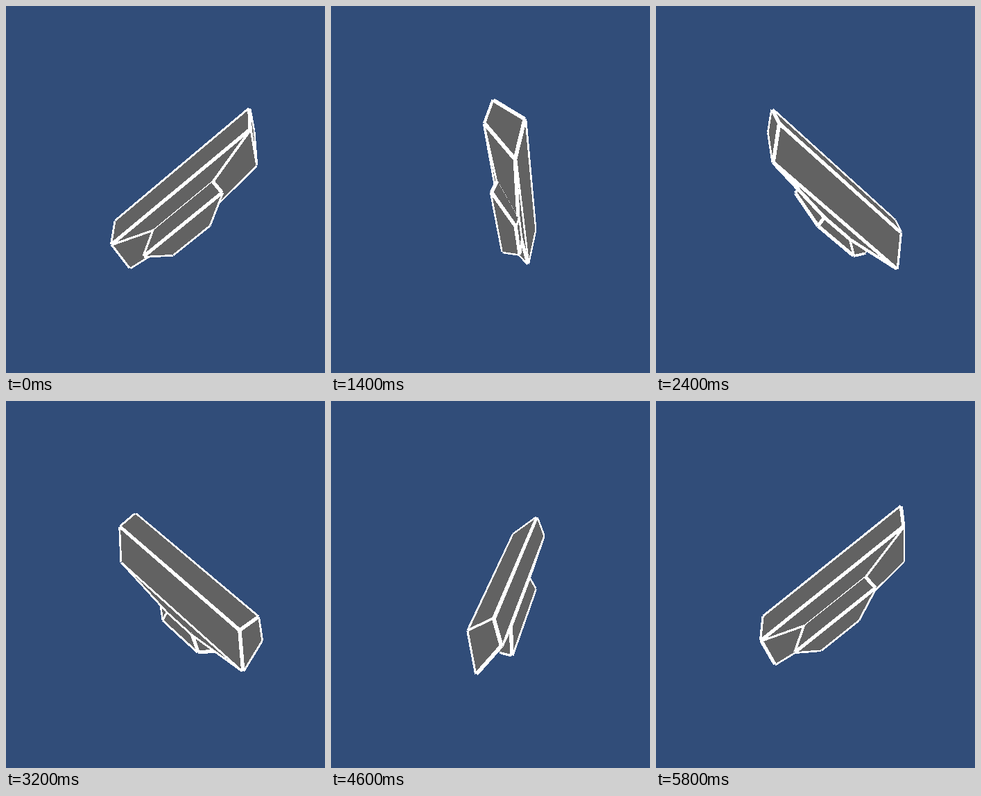
An HTML page with a canvas that plays this animation: 460 by 530 pixels, repeating every 6000 ms.

```html
<!DOCTYPE html>
<html lang="en">
<head>
<meta charset="utf-8">
<title>Rotating solid</title>
<style>
  html, body { margin: 0; width: 100%; height: 100%; overflow: hidden; background: #314d79; }
  canvas { display: block; }
</style>
</head>
<body>
<canvas id="stage" width="460" height="530"></canvas>
<script>
const W = 460, H = 530, CX = 260, CY = 288, DEPTH = 731;
const STEP_MS = 200, STEPS = 30;
const TILT = 38.7 * Math.PI / 180, PHASE = 12.7 * Math.PI / 180;
const LINE = 5, BIAS = 3e-4;
const BACK = 0xff794d31, GREY = 0xff626262, WHITE = 0xffffffff; // ABGR

const ctx = document.getElementById('stage').getContext('2d');
const image = ctx.createImageData(W, H);
const pixels = new Uint32Array(image.data.buffer);
const depths = new Float32Array(W * H);

// Edges along the long axis: cross-section place (u, v), then start and end.
// Each pair of edges makes one ring of four corners.
const bars = [
  [-12, -46.7, -95, 155], [28, -25.7, -95, 141],
  [-22.8, -22, -117, 138], [16.3, 16.8, -130, 113],
  [-14.3, -0.8, -56, 53], [12.5, 27.9, -41, 8],
  [-20.2, 20.7, -90, 54], [9.7, 42.5, -63, 7]
];
const points = bars.flatMap(([u, v, from, to], i) =>
  (i % 2 ? [to, from] : [from, to]).map(t => [t, u, v]));

const faces = [[0, 1, 2, 3], [12, 13, 14, 15]];
const edges = [];
points.forEach((_, i) => {
  const next = i - i % 4 + (i + 1) % 4;
  edges.push([i, next]);
  if (i < 12) {
    edges.push([i, i + 4]);
    faces.push([i, next, next + 4, i + 4]);
  }
});

function project([t, u, v], angle) {
  const h = t * Math.cos(TILT) + v * Math.sin(TILT);
  const y = v * Math.cos(TILT) - t * Math.sin(TILT);
  const c = Math.cos(angle), s = Math.sin(angle);
  const k = DEPTH / (DEPTH + u * c - h * s);
  return { x: CX + (h * c + u * s) * k, y: CY + y * k, k };
}

const cross = (a, b, x, y) => (b.x - a.x) * (y - a.y) - (b.y - a.y) * (x - a.x);

// Depth-tested triangle; a larger k is nearer.
function triangle(a, b, c, colour) {
  const area = cross(a, b, c.x, c.y);
  if (!area) return;
  const x0 = Math.floor(Math.min(a.x, b.x, c.x)), x1 = Math.max(a.x, b.x, c.x);
  const y0 = Math.floor(Math.min(a.y, b.y, c.y)), y1 = Math.max(a.y, b.y, c.y);
  for (let y = y0; y <= y1; y++) {
    for (let x = x0; x <= x1; x++) {
      const wa = cross(b, c, x + 0.5, y + 0.5) / area;
      const wb = cross(c, a, x + 0.5, y + 0.5) / area;
      const wc = 1 - wa - wb;
      if (wa < 0 || wb < 0 || wc < 0) continue;
      const k = wa * a.k + wb * b.k + wc * c.k, at = y * W + x;
      if (k > depths[at]) {
        depths[at] = k;
        pixels[at] = colour;
      }
    }
  }
}

function quad([a, b, c, d], colour) {
  triangle(a, b, c, colour);
  triangle(a, c, d, colour);
}

// A ribbon that faces the viewer, so nearer faces hide part of its width.
function line(a, b) {
  const size = LINE / 2 / Math.hypot(b.x - a.x, b.y - a.y);
  const nx = (a.y - b.y) * size, ny = (b.x - a.x) * size;
  const corner = (p, side) => ({
    x: p.x + nx * p.k * side, y: p.y + ny * p.k * side, k: p.k + BIAS
  });
  quad([corner(a, 1), corner(b, 1), corner(b, -1), corner(a, -1)], WHITE);
}

function draw(step) {
  const pts = points.map(p => project(p, PHASE + step / STEPS * 2 * Math.PI));
  pixels.fill(BACK);
  depths.fill(0);
  faces.forEach(face => quad(face.map(i => pts[i]), GREY));
  edges.forEach(([i, j]) => line(pts[i], pts[j]));
  ctx.putImageData(image, 0, 0);
}

const start = performance.now();
let shown = -1;
function loop() {
  const step = Math.floor((performance.now() - start) / STEP_MS) % STEPS;
  if (step !== shown) draw(shown = step);
  requestAnimationFrame(loop);
}
loop();
</script>
</body>
</html>
```
